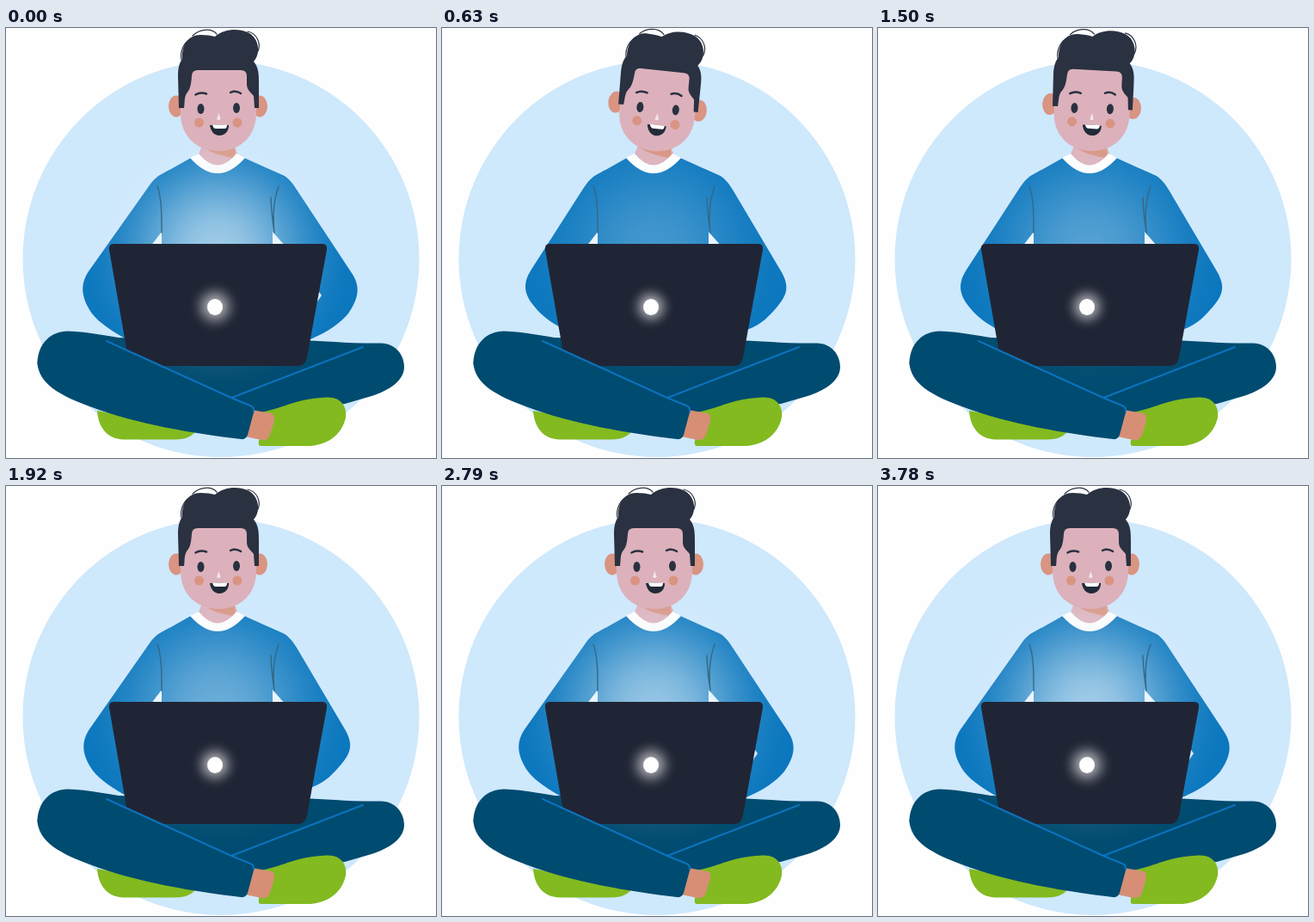
An HTML page with a canvas for the animation above (3840 ms loop, 500 by 500 pixels).

```html
<!DOCTYPE html>
<html lang="en">
<head>
<meta charset="utf-8">
<title>Working on a laptop</title>
<style>
html, body { margin: 0; width: 100%; height: 100%; overflow: hidden; background: #fefefe; }
canvas { display: block; width: 500px; height: 500px; }
</style>
</head>
<body>
<canvas id="stage" width="500" height="500"></canvas>
<script>
const ctx = document.getElementById('stage').getContext('2d');
const LOOP = 3840, STEP = 30, BLINK_PERIOD = 1440, BLINK_AT = 1080;
const HAIR = '#2a3141', PANTS = '#004b70', SEAM = '#0b73bd', SWEATER = '#0b77be', GREEN = '#82ba20';
const SKIN = '#d68f75', FACE = '#dcb1bb', BLUSH = '#d99482', WHITE = '#fefefe', SKY = '#cee8fc';

// Eased 0 to 1 between two times.
function ease(t, from, to) {
  const k = Math.min(1, Math.max(0, (t - from) / (to - from)));
  return k * k * (3 - 2 * k);
}

// Rises, holds, then falls back.
const swing = (t, rise, top, fall, rest) => ease(t, rise, top) - ease(t, fall, rest);

function eyeOpening(t) {
  const distance = Math.abs(t % BLINK_PERIOD - BLINK_AT);
  return 1 - .85 * Math.max(0, 1 - distance / 100);
}

function fill(d, colour) {
  ctx.fillStyle = colour;
  ctx.fill(new Path2D(d));
}

function line(d, colour, width) {
  ctx.strokeStyle = colour;
  ctx.lineWidth = width;
  ctx.lineCap = 'round';
  ctx.stroke(new Path2D(d));
}

function ellipse(x, y, rx, ry, colour) {
  ctx.fillStyle = colour;
  ctx.beginPath();
  ctx.ellipse(x, y, rx, ry, 0, 0, Math.PI * 2);
  ctx.fill();
}

// Radial light whose strength falls off along a cosine raised to a power.
function glow(x, y, r, tint, strength, power) {
  const gradient = ctx.createRadialGradient(x, y, 0, x, y, r);
  for (let i = 0; i <= 10; i++) {
    const falloff = ((1 + Math.cos(Math.PI * i / 10)) / 2) ** power;
    gradient.addColorStop(i / 10, `rgba(${tint},${strength * falloff})`);
  }
  ellipse(x, y, r, r, gradient);
}

function drawBody(left, right) {
  fill('M229 134L223 149Q246 176 270 149L265 134Z', FACE);
  fill('M228 137H265L268 152C253 149 238 146 228 137Z', BLUSH);
  const l = left * 8, r = right * 8.5;
  fill(`M190 165L180 170.500C173 174 168 181 164 187L${96 + l} ${283 - left * 2}
    C${86 + l} ${298 - left} ${87 + l} ${313 - left * 4} ${100 + l} ${332 - left * 8}
    C${108 + l} ${343 - left * 9} 126 ${354 - left * 12} 142 ${363 - left * 13}H190V215Z`, SWEATER);
  fill(`M305 164L318 169.500C327 172 333 180 338 188L${402 - r} ${285 - right * 3}
    C${412 - r} ${300 - right} ${411 - r} ${313 - right * 4} ${398 - r} ${332 - right * 8}
    C${389 - r} ${343 - right * 9} 373 ${354 - right * 10} 354 ${362 - right * 11}H310V215Z`, SWEATER);
  fill(`M362 304L${367 - r} 311L360 321Z`, '#d8eafa');
  fill('M181 237L168 254H182ZM310 237L325 254H309Z', '#edf6fe');
  fill('M215 151Q246 183 277 151L318 169.500L310 238V270H181V238L176 173Z', SWEATER);
  fill('M214 151L224 146Q246 173 268 146L278 151Q246 187 214 151Z', WHITE);
}

function drawLegs() {
  fill('M106 445C107 462 116 478 137 478.500H195C208 479 217 475 222 467Z', GREEN);
  fill('M120 360L345 363C370 364 400 367 436 366.500C454 367 463 381 463 394C463 410 446 421 425 428L394 437L289 448L150 400Z', PANTS);
  fill('M36.500 390C37 367 52 352.500 72 352.500C96 353 120 359 152 363V410H60C45 406 37 400 36.500 390Z', PANTS);
}

function drawFrontLeg() {
  line('M415 371L262 430', SEAM, 2);
  fill('M297 447C325 441 338 431 372 429.500C390 428 397 441 395 453C391 471 377 484 354 486H296C293 486 293 480 296 474Z', GREEN);
  fill('M286 444L308 448C313 449 313 455 311 460L307 473C305 478 302 480 297 479L278 475Z', SKIN);
  fill('M36.500 388C37 414 64 428 100 441C150 460 220 472 273 478Q279 479 281 473L288 447Q289 441 283 438L262 430L117 364L50 366Z', PANTS);
  line('M117 364L262 430L284 439Q289 441 288 446', SEAM, 2);
}

function drawLaptop(light) {
  fill('M125 251H368Q374 251 373 258L350 383Q348 393 339 393H152Q144 393 142 384L120 258Q119 251 125 251Z', '#202535');
  glow(243, 324, 28 + 8 * light, '255,255,255', .65, 1.4);
  ellipse(243, 324.5, 9, 9.5, WHITE);
}

function drawHead(tilt, open) {
  ctx.save();
  ctx.translate(247, 130);
  ctx.rotate(tilt * Math.PI / 30);
  ctx.translate(-247, -130);

  for (const x of [198, 295]) ellipse(x, 91, 9, 12.5, BLUSH);
  fill('M203 45H291V99C291 126 272 143 247 143C222 143 203 126 203 99Z', FACE);

  fill(`M201 93L200 56C200 45 202 40 205 36C204 20 212 8 226 8Q236 8 243 10C253 1 270 0 281 5
    C294 11 297 29 288 39C294 46 294 54 294 65V93H289L288 79C284 74 280 72 280 65V56Q280 49 273 49
    H223Q216 49 216 56C215 68 214 71 210 76C207 81 208 87 207 93Z`, HAIR);
  line('M204 37C202 27 207 17 214 13M217 9C224 2 238 -1 245 7M281 4C291 6 297 17 293 27', HAIR, 1.2);

  line('M220.500 77.500Q226 74 233 76.500M261 75Q267 72 273 76', HAIR, 2.5);
  ellipse(226.5, 94, 4, 6 * open, HAIR);
  ellipse(268, 93, 4, 6 * open, HAIR);
  for (const x of [224.5, 269]) ellipse(x, 110, 5.5, 5.5, BLUSH);
  fill('M247.500 99L249.500 106Q247 108 245 106Z', '#f3e6ea');
  fill('M237 113Q248 112 259 113C259 121 254 125 248 125C242 125 238 120 237 113Z', '#222a38');
  fill('M240 112.500H257Q257 117 254 117H244Q241 117 240 112.500Z', WHITE);
  ctx.restore();
}

function draw(t) {
  const light = .68 - .42 * swing(t, 0, 500, 800, 3300);

  ctx.fillStyle = WHITE;
  ctx.fillRect(0, 0, 500, 500);
  ellipse(250, 268.5, 230.5, 230.5, SKY);
  drawBody(swing(t, 0, 700, 1300, 2100), swing(t, 0, 700, 1920, 2750));
  drawLegs();
  glow(246, 260, 172, '229,242,250', light, 1.2);
  line('M176 184C181 198 181 215 181 238M317 184C311 200 310 218 312 238M308 197Q309 220 312 237', '#356885', 1.4);
  drawLaptop(light);
  drawFrontLeg();
  drawHead(swing(t, 0, 270, 1350, 1650), eyeOpening(t));
}

const start = performance.now();
function frame() {
  const t = (performance.now() - start) % LOOP;
  draw(Math.min(Math.floor(t / STEP) * STEP, LOOP - 2 * STEP));
  requestAnimationFrame(frame);
}
frame();
</script>
</body>
</html>
```
